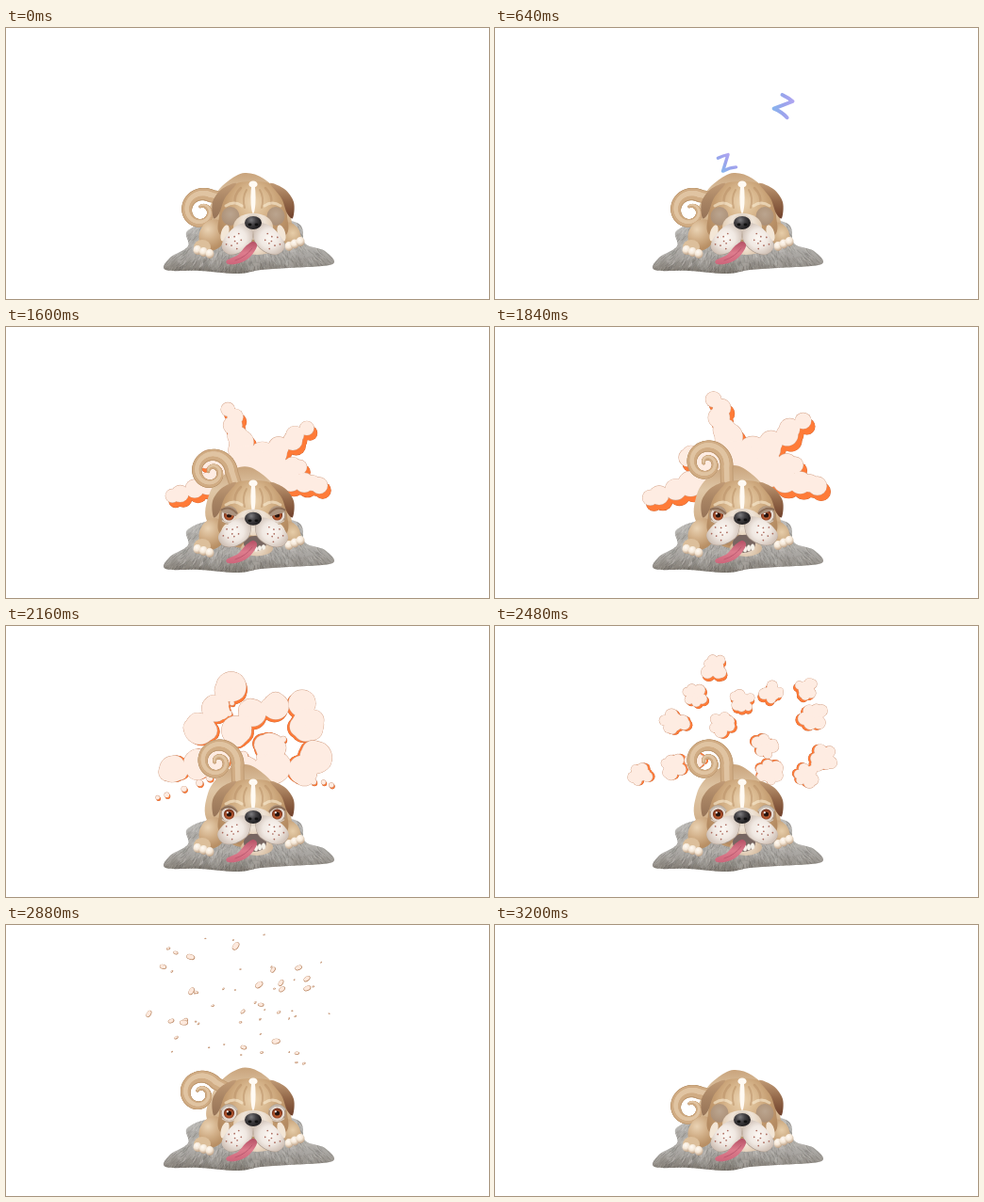
Write an HTML page with a canvas that moves like this. It is 512 px wide and 288 px high and loops after 3600 ms.

```html
<!DOCTYPE html>
<html lang="en">
<head>
<meta charset="utf-8">
<title>Sleepy dog</title>
<style>
html, body { margin: 0; width: 100%; height: 100%; overflow: hidden; background: #fff; }
canvas { display: block; width: 512px; height: 288px; }
</style>
</head>
<body>
<canvas id="stage"></canvas>
<script>
const LOOP = 3600, STEP = 80, W = 512, H = 288, AXIS = 262;
const ratio = window.devicePixelRatio || 1;
let c = prepare(document.getElementById('stage'));

function prepare(canvas) {
  canvas.width = W * ratio;
  canvas.height = H * ratio;
  const ctx = canvas.getContext('2d');
  ctx.scale(ratio, ratio);
  ctx.lineCap = ctx.lineJoin = 'round';
  return ctx;
}

function random(seed) {
  const next = () => (seed = (seed * 16807) % 2147483647) / 2147483647;
  next();
  return next;
}

const mix = (a, b, u) => a + (b - a) * u;
const clamp = u => Math.max(0, Math.min(1, u));
const span = (t, from, to) => clamp((t - from) / (to - from));

// Values at time t from rows of [time, ...values]
function keyed(t, rows) {
  let i = 0;
  while (i < rows.length - 2 && t >= rows[i + 1][0]) i++;
  const a = rows[i], b = rows[i + 1], u = span(t, a[0], b[0]);
  return a.slice(1).map((v, j) => mix(v, b[j + 1], u));
}

function shade(g, colors) {
  colors.forEach((col, i) => g.addColorStop(i / (colors.length - 1), col));
  return g;
}
const radial = (x, y, r, ...colors) => shade(c.createRadialGradient(x, y, 0, x, y, r), colors);
const linear = (y0, y1, ...colors) => shade(c.createLinearGradient(0, y0, 0, y1), colors);

function oval(x, y, rx, ry, fill, rot = 0) {
  c.beginPath();
  c.ellipse(x, y, Math.max(0, rx), Math.max(0, ry), rot, 0, 7);
  c.fillStyle = fill;
  c.fill();
}

// Smooth closed curve through the points
function trace(pts) {
  const n = pts.length, at = i => pts[(i + n) % n];
  c.beginPath();
  c.moveTo(...pts[0]);
  for (let i = 0; i < n; i++) {
    const [a, b, d, e] = [at(i - 1), at(i), at(i + 1), at(i + 2)];
    c.bezierCurveTo(b[0] + (d[0] - a[0]) / 6, b[1] + (d[1] - a[1]) / 6,
      d[0] - (e[0] - b[0]) / 6, d[1] - (e[1] - b[1]) / 6, d[0], d[1]);
  }
  c.closePath();
}

function blob(pts, fill) {
  trace(pts);
  c.fillStyle = fill;
  c.fill();
}

function arc(x0, y0, qx, qy, x1, y1, color, width) {
  c.beginPath();
  c.moveTo(x0, y0);
  c.quadraticCurveTo(qx, qy, x1, y1);
  c.strokeStyle = color;
  c.lineWidth = width;
  c.stroke();
}

// Points given as distance from the face axis, placed on one side
const sided = (pts, side) => pts.map(([d, y]) => [AXIS + side * d, y]);

// Fur rug, painted once
const rug = document.createElement('canvas');
function paintRug() {
  const screen = c, rnd = random(77);
  c = prepare(rug);
  const edge = [[169, 257], [174, 244], [193, 232], [193, 215], [230, 204], [306, 206],
    [317, 229], [338, 237], [346, 251], [300, 255], [270, 257], [246, 261], [205, 258]];
  trace(edge);
  c.fillStyle = linear(204, 262, '#bdbcba', '#b3b1ad', '#a9a6a2', '#777067');
  c.fill();
  c.clip();
  for (let i = 0; i < 60; i++) {
    const v = Math.round(130 + rnd() * 90);
    oval(165 + rnd() * 185, 208 + rnd() * 46, 7, 4, `rgba(${v},${v - 2},${v - 6},.25)`, rnd() * 3);
  }
  for (let i = 0; i < 1800; i++) {
    const x = 165 + rnd() * 185, y = 203 + rnd() * 58, lean = (x - 258) * .05 + rnd() * 4 - 2;
    const v = Math.round(95 + rnd() * 130 - Math.max(0, y - 246) * 3);
    arc(x, y, x + lean * .2, y + 2, x + lean, y + 4, `rgba(${v},${v - 3},${v - 8},.4)`, .8);
  }
  c = screen;
}

// Snore letters rise in a line or a bend
const snores = [
  { from: 160, to: 1280, x0: 245, x1: 343, bend: .56, turn: .72 },
  { from: 560, to: 1440, x0: 254, x1: 157, bend: 1, turn: -.18 },
  { from: 1040, to: 1600, x0: 249, x1: 250, bend: 1, turn: 0 }
];

function drawSnore(t, { from, to, x0, x1, bend, turn }) {
  if (t < from || t >= to) return;
  const u = span(t, from, to), size = mix(.82, 1.22, u);
  c.save();
  c.translate(mix(x0, x1, Math.pow(u, bend)), mix(160, -20, u));
  c.rotate(turn);
  c.scale(size, size);
  c.strokeStyle = shade(c.createLinearGradient(-10, 8, 10, -8), ['#86b7ee', '#9aa3ec', '#b4a6f2']);
  c.lineWidth = 4;
  c.beginPath();
  c.moveTo(-9, -8);
  c.quadraticCurveTo(-2, -10, 4, -10);
  c.lineTo(-6, 9);
  c.quadraticCurveTo(3, 6, 11, 7);
  c.stroke();
  c.restore();
}

// Burst: lobes strung along arms, from the middle to each tip
function makeBurst() {
  const rnd = random(12), lobes = [];
  for (const [x, y] of [[235, 79], [326, 99], [322, 146], [345, 171], [164, 181], [203, 137]]) {
    for (let i = 0; i <= 7; i++) {
      const f = i / 7;
      lobes.push([mix(256, x, f) + rnd() * 8 - 4, mix(148, y, f) + rnd() * 6 - 3, mix(22, 8, Math.sqrt(f)) + rnd() * 2]);
    }
  }
  return lobes;
}

// Puffs: each a cluster of small lobes round a centre
function makePuffs() {
  const rnd = random(5), lobes = [];
  const centres = [[233, 44], [211, 74], [190, 102], [240, 104], [262, 80], [294, 71], [330, 67], [338, 96],
    [349, 141], [331, 158], [287, 128], [291, 156], [188, 150], [213, 143], [153, 157]];
  for (const [x, y] of centres) {
    const size = .8 + rnd() * .2;
    lobes.push([x, y, 10 * size]);
    for (let i = 0; i < 6; i++) {
      const a = i * 1.05 + rnd(), d = (7 + rnd() * 3) * size;
      lobes.push([x + Math.cos(a) * d * 1.15, y + Math.sin(a) * d, (4.5 + rnd() * 3) * size]);
    }
  }
  return lobes;
}
const burst = makeBurst(), puffs = makePuffs();

// Lobes are [x, y, radius, shadow dx, shadow dy]
function drawCloud(lobes) {
  const layer = (grow, shift, fill) => lobes.forEach(([x, y, r, dx, dy]) =>
    r > .5 && oval(x + dx * shift, y + dy * shift, r + grow, r + grow, fill));
  layer(.3, 1, '#c8602f');
  layer(0, 1, '#ff7b38');
  layer(.4, 0, '#d3a085');
  layer(0, 0, '#feece2');
}

function drawExplosion(t) {
  if (t < 1360 || t >= 2800) return;
  const u = span(t, 1840, 2480), grow = 1 - Math.pow(1 - span(t, 1280, 1840), 2.5);
  const keep = grow * clamp(1 - u * 1.5);
  const lobes = burst.map(([x, y, r]) =>
    [mix(262, x, grow + u * .08), mix(165, y, grow + u * .1), r * keep, 4 * keep, 6 * keep]);
  if (u > 0) {
    const fade = span(t, 2800, 2480), swell = (1 + .7 * Math.sin(Math.PI * u)) * fade;
    for (const [x, y, r] of puffs) {
      const away = Math.hypot(268 - x, 112 - y);
      lobes.push([mix(258, x, .55 + .45 * u), mix(135, y, .55 + .45 * u) - (1 - fade) * 12, r * swell,
        (268 - x) / away * 2.5, (112 - y) / away * 2.5 + .8]);
    }
  }
  drawCloud(lobes);
}

function drawFlakes(t) {
  if (t < 2640 || t >= 3200) return;
  const rnd = random(31), drift = (2880 - t) / 30;
  const size = t < 2880 ? mix(1.6, 1, span(t, 2640, 2880)) : span(t, 3200, 2880);
  for (let i = 0; i < 58; i++) {
    const x = 250 + (rnd() - .5) * mix(150, 210, rnd()), y = 8 + Math.pow(rnd(), .8) * 140 + drift;
    const r = (1.1 + Math.pow(rnd(), 3) * 4) * size, turn = .3 - rnd() * 1.4 + drift * .04;
    oval(x, y, r, r * .62, '#b98560', turn);
    oval(x - .2, y - .2, r - .6, r * .62 - .45, '#fde9dd', turn);
  }
}

// A spiral whose centre rises and whose root swings round
function drawTail(rise) {
  const [cx, cy] = keyed(rise, [[0, 207, 195], [.5, 205, 173], [1, 224, 145]]);
  const from = mix(1.05, -.2, rise), to = Math.PI * mix(2.6, 3, rise);
  const path = [[mix(240, 246, rise), mix(184, 170, rise)]];
  for (let a = from; a < to; a += .08) {
    const r = 21.5 - a * 2;
    path.push([cx + Math.cos(a) * r, cy - Math.sin(a) * r]);
  }
  const pass = (scale, color, dy) => {
    c.strokeStyle = color;
    for (let i = 1; i < path.length; i++) {
      c.lineWidth = mix(14, 3, i / path.length) * scale;
      c.beginPath();
      c.moveTo(path[i - 1][0], path[i - 1][1] + dy);
      c.lineTo(path[i][0], path[i][1] + dy);
      c.stroke();
    }
  };
  pass(1, '#bf9a72', 0);
  pass(.85, '#d0ac84', -.2);
  pass(.4, '#e0c4a2', -1);
}

function drawBody(rise) {
  const top = 154 - 7 * rise;
  blob([[214, 208], [mix(222, 214, rise), 178], [mix(235, 229, rise), mix(163, 157, rise)], [253, top],
    [273, 160 - 3 * rise], [291, 179], [301, 215], [250, 235]],
  linear(top, 225, '#c9a47c', '#dfc6a6', '#d6b792', '#bd966c'));
}

function drawPaws() {
  oval(219, 220, 14, 17, radial(214, 214, 21, '#ead3b4', '#d2b089', '#b88f64'), .4);
  oval(208, 233, 9, 8, '#dcbf9b');
  oval(302, 220, 10, 14, radial(304, 218, 16, '#e6cda9', '#bd956a'), -.4);
  for (let i = 0; i < 3; i++) {
    for (const [x, y] of [[203 + i * 6.5, 236 + i * 2], [300 + i * 6, 232 - i * 2.5]])
      oval(x, y, 4.5, 5, radial(x - 1, y - 2, 7, '#fffaf4', '#f5e8d8', '#bd9f82'));
  }
}

function drawEye(x, y, side, open, anger) {
  oval(x, y, 9.5, 10, radial(x, y - 2, 11, '#bba58f', '#b49b83', '#ab9078'));
  if (open <= 0) return;
  c.save();
  c.beginPath();
  c.arc(x, y, 8, 0, 7);
  c.clip();
  oval(x, y, 8, 8, '#e4dbd3');
  oval(x, y, 5.6, 5.6, radial(x, y + 1, 6, '#dc8a52', '#b5572e', '#70301c'));
  oval(x, y, 2.6, 2.6, '#26120d');
  oval(x - 1.7, y - 1.7, 1.1, 1.1, '#fff');
  c.translate(x, y - 8 + 16 * (1 - open));
  c.rotate(side * anger);
  c.fillStyle = '#ac9480';
  c.fillRect(-16, -22, 32, 22);
  c.restore();
  const tilt = side * anger * 6;
  arc(x - 8, y - 4 - tilt, x, y - 13 + anger * 9, x + 8, y - 4 + tilt, anger > .1 ? '#8d6f58' : '#c2b8ad', 2);
  arc(x - 7, y + 6, x, y + 11, x + 7, y + 6, '#d9c9b8', 1.5);
}

function drawMuzzle(mouth) {
  const noseY = mix(207, 203, mouth);
  oval(266, 235, 17, mix(6, 9, mouth), radial(266, 233, 17, '#f5e8da', '#d2b799'));
  if (mouth > 0) {
    oval(264, 230, 12, 10 * mouth, '#776661');
    for (let i = 0; i < 5; i++) oval(257 + i * 4, 236 - Math.abs(i - 2), 2, 3.5 * mouth, '#f6f2ea');
  }
  oval(AXIS, noseY + 4, 21, 14, radial(AXIS, noseY, 22, '#b7a695', '#efe4d8', '#e2ccb2'));
  for (const side of [-1, 1]) {
    // Drooping cheek, swung outward as the mouth opens
    c.save();
    c.translate(AXIS, noseY);
    c.scale(side, 1);
    c.rotate(-mouth * .2);
    const cheek = [[3, 2], [16, 3], [28, 14], [33, 26], [25, 34], [12, 31], [1, 19]];
    blob(cheek, '#a8978a');
    c.translate(.4, -.5);
    blob(cheek, radial(17, 17, 20, '#fcf8f4', '#f0e8e2', '#c9b9ad'));
    for (let i = 0; i < 9; i++) {
      const d = 3.4 * Math.sqrt(i);
      oval(19 + Math.cos(i * 2.4) * d, 20 + Math.sin(i * 2.4) * d, .85, .85, '#a9695c');
    }
    c.restore();
  }
  blob([[262, 227], [266, 232], [258, 244], [247, 250], [236, 251], [234, 247], [246, 241], [254, 232]],
    linear(226, 252, '#b24d62', '#dd7c8d', '#cc6479'));
  arc(261, 234, 255, 243, 243, 247, '#b4536a', .8);
  oval(AXIS, noseY, 9, 7, radial(260, noseY - 3, 10, '#7d7c7f', '#434144', '#232123'));
  for (const side of [-1, 1]) oval(AXIS + side * 3.5, noseY + 2, 2, 1.4, '#111');
}

function drawHead(mouth, open, anger) {
  const half = [[19, 166], [31, 180], [36, 200], [34, 221]];
  blob([[AXIS, 163], ...sided(half, 1), [AXIS, 236], ...sided(half, -1).reverse()],
    radial(AXIS, 186, 44, '#ecd4b2', '#dbbb92', '#c49c70', '#b48b62'));
  const ear = [[18, 165], [33, 171], [43, 185], [42, 202], [36, 197], [30, 181]];
  for (const side of [-1, 1]) {
    blob(sided(ear, side), linear(165, 203, '#c09a75', side < 0 ? '#a88463' : '#94694a', side < 0 ? '#967357' : '#6f402b'));
    const fold = (d0, y0, qd, qy, d1, y1, color, width) =>
      arc(AXIS + side * d0, y0, AXIS + side * qd, qy, AXIS + side * d1, y1, color, width);
    fold(7, 172, 12, 180, 9, 191, 'rgba(165,120,78,.35)', 2);
    fold(13, 170, 21, 178, 19, 187, 'rgba(165,120,78,.3)', 2.5);
    fold(12, 189, 20, 183, 29, 189, 'rgba(250,236,212,.6)', 3);
    oval(AXIS + side * 30, 218, 4, 9, '#f3e6d6', side * -.3);
  }
  oval(AXIS, 180, 2.6, 17, '#fffaf3');
  oval(AXIS, 166, 4.6, 3.6, '#fffaf3');
  for (const side of [-1, 1]) drawEye(AXIS + side * (open > 0 ? 25.5 : 24), 200, -side, open, anger);
  drawMuzzle(mouth);
}

function draw(t) {
  c.fillStyle = '#fff';
  c.fillRect(0, 0, W, H);
  const [rise] = keyed(t, [[0, 0], [720, 0], [1280, .5], [1760, 1], [2480, 1], [2880, .35], [3200, 0]]);
  const [open, anger] = keyed(t, [[1280, 0, 0], [1680, .68, .35], [1920, .68, .35], [2320, 1, 0], [2880, .95, 0], [3200, 0, 0]]);
  const mouth = span(t, 1280, 1680) * span(t, 2800, 2480);
  snores.forEach(letter => drawSnore(t, letter));
  drawExplosion(t);
  drawFlakes(t);
  c.drawImage(rug, 0, 0, W, H);
  drawBody(rise);
  drawTail(rise);
  drawPaws();
  drawHead(mouth, open, anger);
}

paintRug();
const start = performance.now();
function tick() {
  const t = (performance.now() - start) % LOOP;
  draw(Math.floor(t / STEP) * STEP);
  requestAnimationFrame(tick);
}
tick();
</script>
</body>
</html>
```
